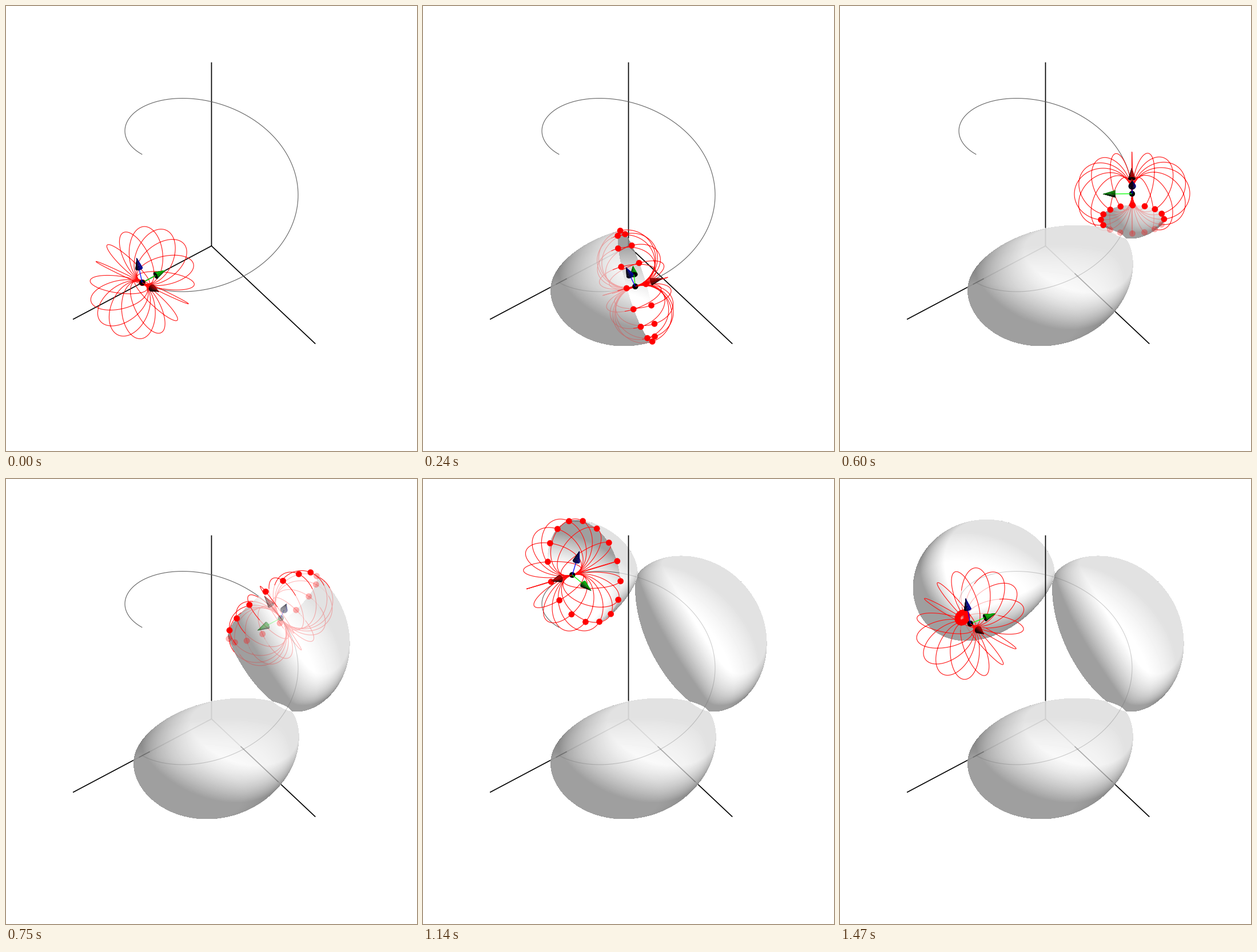
A matplotlib script that plays this animation: 719 by 779 pixels, repeating every 1.5 s.

```python
import numpy as np
import matplotlib.pyplot as plt
from matplotlib.animation import FuncAnimation
from matplotlib.collections import PolyCollection

W, H, DPI = 719, 779, 64
FRAMES, INTERVAL = 50, 30
SCALE, CX, CY = 151.5, 359.5, 420.0
R = 1 / 3                      # radius of the rolling circles
PITCH = 1 / 3
SPEED = np.hypot(1, PITCH)
SPOKES = 16
CLEAR = 0.3                    # light passing through one wall
AZ, EL = np.arctan2(0.8, 0.6), np.pi / 4

RIGHT = np.array([-np.sin(AZ), np.cos(AZ), 0])
TOWARD = np.array([np.cos(AZ) * np.cos(EL), np.sin(AZ) * np.cos(EL), np.sin(EL)])
UP = np.cross(TOWARD, RIGHT)
LIGHT = np.array([0.5, 0.62, 0.6])


def project(p):
    """World points to pixel x, pixel y and depth (larger is nearer)."""
    return np.stack([CX + SCALE * (p @ RIGHT),
                     CY - SCALE * (p @ UP),
                     SCALE * (p @ TOWARD)], axis=-1)


def helix(t):
    return np.stack([np.cos(t), np.sin(t), PITCH * t], axis=-1)


def frame_axes(t):
    """Tangent, normal and binormal of the helix."""
    c, s, one = np.cos(t), np.sin(t), np.ones_like(t)
    tangent = np.stack([-s, c, PITCH * one], axis=-1) / SPEED
    normal = np.stack([-c, -s, 0 * one], axis=-1)
    return tangent, normal, np.cross(tangent, normal)


def torus(t, psi, u):
    """Point at roll angle psi on the circle with azimuth u."""
    tan, nor, bino = frame_axes(t)
    psi, u = np.asarray(psi)[..., None], np.asarray(u)[..., None]
    spoke = np.cos(u) * nor + np.sin(u) * bino
    return helix(t) - R * np.sin(psi) * tan + R * (1 - np.cos(psi)) * spoke


def swept(t, u):
    return torus(t, SPEED * t / R, u)


def shade(n):
    return 255 * np.clip(0.46 + 0.9 * np.maximum(n @ LIGHT, 0), 0, 1)


class Walls:
    """Nearest and farthest wall of the swept surface for every pixel."""

    def __init__(self):
        self.near = np.full(W * H, -np.inf)
        self.far = np.full(W * H, np.inf)
        self.near_tone = np.full(W * H, 255.0)
        self.far_tone = np.full(W * H, 255.0)

    def add(self, t0, t1, steps=84, around=1040):
        t, u = np.meshgrid(np.linspace(t0, t1, steps),
                           np.linspace(0, 2 * np.pi, around, endpoint=False))
        t, u = t.ravel(), u.ravel()
        h = 1e-4
        p = project(swept(t, u))
        n = np.cross(project(swept(t + h, u)) - p, project(swept(t, u + h)) - p)
        n[:, 1] *= -1
        n *= np.where(n[:, 2] < 0, -1, 1)[:, None]
        n /= np.linalg.norm(n, axis=1)[:, None] + 1e-12
        tone, depth = shade(n), p[:, 2]
        cell = p[:, 1].astype(int) * W + p[:, 0].astype(int)
        order = np.argsort(depth)
        self.keep(order, cell, depth, tone, self.near, self.near_tone, 1)
        self.keep(order[::-1], cell, depth, tone, self.far, self.far_tone, -1)

    @staticmethod
    def keep(order, cell, depth, tone, zbuf, tones, sign):
        k = order[sign * (depth[order] - zbuf[cell[order]]) > 0]
        zbuf[cell[k]] = depth[k]
        tones[cell[k]] = tone[k]

    def double(self):
        return np.isfinite(self.near) & (self.near - self.far > 4)

    def image(self):
        behind = np.where(self.double(),
                          (1 - CLEAR) * self.far_tone + CLEAR * 255, 255)
        img = np.where(np.isfinite(self.near),
                       (1 - CLEAR) * self.near_tone + CLEAR * behind, 255)
        return img.reshape(H, W).round().astype(np.uint8)

    def cover(self, p, eps):
        """Number of walls in front of projected points."""
        x = np.clip(p[..., 0].astype(int), 0, W - 1)
        y = np.clip(p[..., 1].astype(int), 0, H - 1)
        c, d = y * W + x, p[..., 2] + eps
        both = (self.near[c] - self.far[c] > 4) & np.isfinite(self.near[c])
        return (self.near[c] > d).astype(int) + (both & (self.far[c] > d))


def split(walls, paths):
    """Cut polylines by how many walls hide them: three broken lines."""
    parts = [[], [], []]
    for path in paths:
        p = project(path)
        level = walls.cover(p, 2)
        before = np.concatenate([level[:1], level[:-1]])
        for n in range(3):
            shown = ((level == n) | (before == n))[:, None]
            xy = np.where(shown, p[:, :2], np.nan)
            parts[n].append(np.vstack([xy, [[np.nan, np.nan]]]))
    return [np.vstack(part) for part in parts]


def disc(center, radius):
    a = np.linspace(0, 2 * np.pi, 25)
    return center[:2] + radius * np.stack([np.cos(a), np.sin(a)], axis=-1)


def arrow(walls, start, d, side1, side2, color):
    """Shaft and cone pieces as (depth, polygon, rgba, line width)."""
    color = np.array(color, float)
    tip, base = start + R * d, start + (R - 0.14) * d
    a = np.linspace(0, 2 * np.pi, 25)[:, None]
    rim = base + 0.042 * (np.cos(a) * side1 + np.sin(a) * side2)
    shaft = project(np.array([start, base]))
    mid = shaft.mean(axis=0)
    alpha = CLEAR ** int(walls.cover(mid, 3))
    out = [(mid[2], shaft[:, :2], (*color, alpha), 1.3)]
    alpha = CLEAR ** int(walls.cover(project(base), 3))
    for p0, p1 in zip(rim[:-1], rim[1:]):
        n = np.cross(p1 - p0, tip - p0)
        n /= np.linalg.norm(n)
        if n @ TOWARD > 0:
            lit = max(0, np.array([n @ RIGHT, n @ UP, n @ TOWARD]) @ LIGHT)
            tri = project(np.array([p0, p1, tip]))
            rgb = color * (0.06 + 0.62 * lit)
            out.append((tri[:, 2].mean(), tri[:, :2], (*rgb, alpha), 0.3))
    if d @ TOWARD < 0:
        cap = project(rim)
        out.append((cap[:, 2].mean() + 2, cap[:, :2], (0, 0, 0, alpha), 0.3))
    return out


AXES = [np.linspace(0, 1, 400)[:, None] * np.array(end)
        for end in ([2, 0, 0], [0, 2, 0], [0, 0, 3])]
CURVE = [helix(np.linspace(0, 2 * np.pi, 1200))]
SPOKE = 2 * np.pi * np.arange(SPOKES) / SPOKES
ROLL = np.linspace(0, 2 * np.pi, 360)


def build(walls, t):
    t = np.float64(t)
    loops = [torus(t, ROLL, np.full_like(ROLL, u)) for u in SPOKE]
    lines = [split(walls, group) for group in (AXES, CURVE, loops)]

    items = []
    for p in project(swept(t, SPOKE)):
        alpha = CLEAR ** int(walls.cover(p, 7))
        items.append((p[2], disc(p, 5.2), (1, 0, 0, alpha), 0.3))
    here = helix(t)
    tan, nor, bino = frame_axes(t)
    items += arrow(walls, here, tan, nor, bino, (1, 0, 0))
    items += arrow(walls, here, nor, bino, tan, (0, 1, 0))
    items += arrow(walls, here, bino, tan, nor, (0, 0, 1))
    p = project(here)
    alpha = CLEAR ** int(walls.cover(p, 3))
    items.append((p[2], disc(p, 5.0), (0, 0, 0, alpha), 0.3))
    items.sort(key=lambda item: item[0])
    return walls.image(), lines, items


def build_all():
    walls, scenes = Walls(), []
    times = 2 * np.pi * np.arange(FRAMES) / FRAMES
    for i, t in enumerate(times):
        if i:
            walls.add(times[i - 1], t)
        scenes.append(build(walls, t))
    return scenes


scenes = build_all()
PX = 72 / DPI

fig = plt.figure(figsize=(W / DPI, H / DPI), dpi=DPI, facecolor="white")
ax = fig.add_axes([0, 0, 1, 1])
ax.set_axis_off()
picture = ax.imshow(scenes[0][0], cmap="gray", vmin=0, vmax=255,
                    extent=(0, W, H, 0), interpolation="nearest", aspect="auto")
ax.set_xlim(0, W)
ax.set_ylim(H, 0)

STYLES = [("black", 1.7), ("#606060", 1.1), ("#ff1414", 1.1)]
strokes = [[ax.plot([], [], color=color, lw=width * PX, alpha=CLEAR ** n,
                    solid_capstyle="butt", zorder=2 + k)[0] for n in range(3)]
           for k, (color, width) in enumerate(STYLES)]
solids = PolyCollection([], zorder=6)
ax.add_collection(solids, autolim=False)


def draw(i):
    img, lines, items = scenes[i]
    picture.set_data(img)
    for group, parts in zip(strokes, lines):
        for stroke, xy in zip(group, parts):
            stroke.set_data(xy[:, 0], xy[:, 1])
    solids.set_verts([item[1] for item in items])
    colors = [item[2] for item in items]
    solids.set_facecolor(colors)
    solids.set_edgecolor(colors)
    solids.set_linewidth([item[3] * PX for item in items])
    return [picture, solids, *sum(strokes, [])]


anim = FuncAnimation(fig, draw, frames=FRAMES, interval=INTERVAL,
                     repeat=True, repeat_delay=0, blit=False)
plt.show()
```
